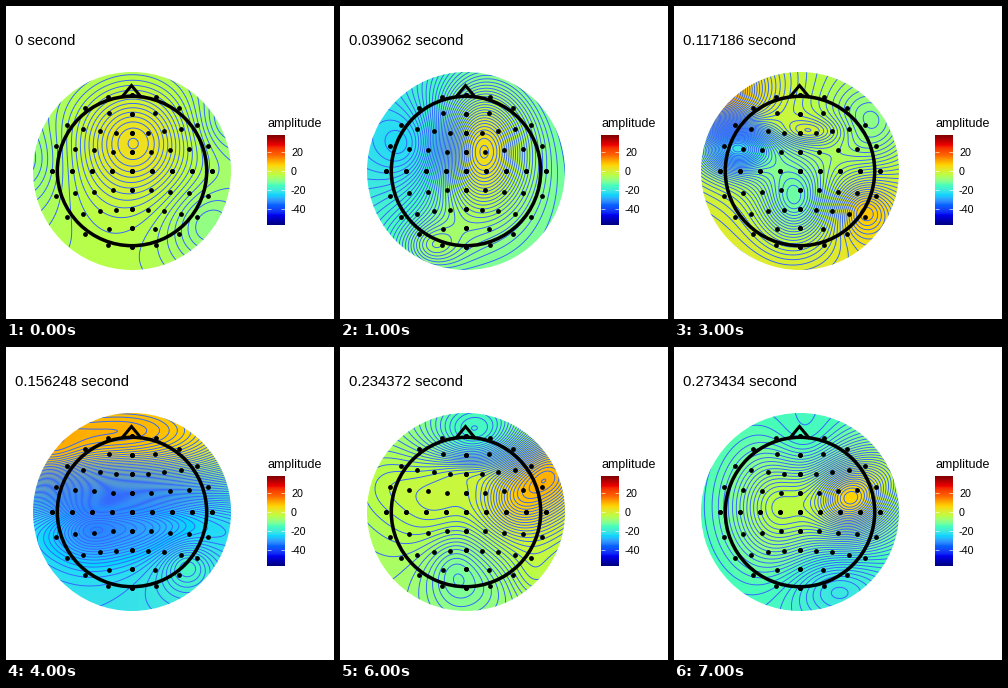
Animation of 328x313 px, one loop 8000 ms. Source, as a matplotlib script:

```python
import numpy as np
import matplotlib.pyplot as plt
from matplotlib.animation import FuncAnimation
from matplotlib.patches import Circle

W, H, DPI = 328, 313, 64
PT = 72 / DPI                      # points per pixel
CX, CY, R = 126, 165, 99
LOW, HIGH = -57, 38
STEP = 0.039062                    # seconds between samples
LEVELS = np.arange(-60, 40, 0.7)
FONT = "Liberation Sans"

# Scalp coordinates: the disc has radius 1 and y points down
axis = np.arange(-R - 1, R + 2)
GX, GY = np.meshgrid(CX + axis, CY + axis)
X, Y = (GX - CX) / R, (GY - CY) / R


def hill(x, y, height, width, tall=1):
    """Smooth source with a long tail; tall is its height-to-width ratio."""
    q = ((X - x) / width) ** 2 + ((Y - y) / (width * tall)) ** 2
    return height / (1 + q) ** 2


def make_fields():
    """One potential map per sample."""
    start = (-7 + 2 * Y + hill(.02, -.3, 12, .85) + hill(-1.1, -.1, -4, .6)
             + hill(.95, -.5, -4, .5) + hill(.75, .55, -5, .6))
    central = (-18 + 2 * X + 2 * Y + hill(.14, -.22, 25, .7, 1.35)
               + hill(-.5, -.25, -10, .65) + hill(-.35, .75, 8, .45, .8))
    patchy = (3 * Y + hill(-.8, -.75, 18, .6) + hill(-.65, -.25, -25, .5, .7)
              + hill(-.05, .3, -13, .5, 1.2) + hill(.1, -.4, 6, .5, .4)
              + hill(.65, .4, 9, .4) + hill(.7, -.45, -9, .65))
    banded = (-23 + hill(0, -.8, 33, 2.5, .4) + hill(0, .1, -17, 1.6, .32)
              + hill(-.9, -.55, 10, .6) + hill(-.45, .17, -5, .45)
              + hill(.55, .52, 7, .4))
    lateral = (3 + hill(.85, -.42, 24, .6) + hill(.15, -.8, -24, .9, .7)
               + hill(0, -.42, 10, .5, .5) + hill(-.8, -.3, 6, .6)
               + hill(-.12, .53, -13, .5, 1.4) + hill(.65, .67, 8, .45))
    paired = (-17 + hill(.5, -.13, 20, .55) + hill(-.26, -.05, 12, .65, 1.4)
              + hill(.05, -.65, -5, .6) + hill(.35, .75, -7, .75, .7)
              + hill(.9, -.4, 7, .6))
    return [start, central, (central + patchy) / 2, patchy,
            banded, lateral, (lateral + paired) / 2, paired]


def make_electrodes():
    """Curved rows mirrored about both axes: (count, spacing, bend)."""
    rows = [(5, 19.9, 0), (5, 19, .38), (5, 16.2, .5), (3, 23.3, 1.4), (2, 24, -2)]
    return np.array([(CX + sx * gap * k, CY + sy * (19 * r + bend * k * k))
                     for r, (count, gap, bend) in enumerate(rows)
                     for k in range(count) for sx in (-1, 1) for sy in (-1, 1)])


FIELDS = make_fields()
ELECTRODES = make_electrodes()

XYZ = np.array([[.4124, .3576, .1805], [.2126, .7152, .0722],
                [.0193, .1192, .9505]])
WHITE = XYZ.sum(axis=1)


def rgb_to_lab(rgb):
    lin = np.where(rgb > .04045, ((rgb + .055) / 1.055) ** 2.4, rgb / 12.92)
    t = lin @ XYZ.T / WHITE
    f = np.where(t > .008856, np.cbrt(t), 7.787 * t + 16 / 116)
    x, y, z = f.T
    return np.stack([116 * y - 16, 500 * (x - y), 200 * (y - z)], axis=1)


def lab_to_rgb(lab):
    y = (lab[:, 0] + 16) / 116
    f = np.stack([y + lab[:, 1] / 500, y, y - lab[:, 2] / 200], axis=1)
    t = np.where(f > .2069, f ** 3, (f - 16 / 116) / 7.787)
    lin = np.clip((t * WHITE) @ np.linalg.inv(XYZ).T, 0, 1)
    return np.where(lin > .0031308, 1.055 * lin ** (1 / 2.4) - .055, 12.92 * lin)


def make_palette(size=512):
    """Jet in ten stops, blended in Lab space."""
    stops, fine = np.linspace(0, 1, 10), np.linspace(0, 1, size)
    jet = np.clip(1.5 - abs(4 * stops[:, None] - [3, 2, 1]), 0, 1)
    lab = [np.interp(fine, stops, c) for c in rgb_to_lab(jet).T]
    return np.clip(lab_to_rgb(np.stack(lab, axis=1)), 0, 1)


PALETTE = make_palette()


def colourise(values):
    t = np.clip((values - LOW) / (HIGH - LOW), 0, 1)
    return PALETTE[np.rint(t * (len(PALETTE) - 1)).astype(int)]


fig = plt.figure(figsize=(W / DPI, H / DPI), dpi=DPI, facecolor="white")
ax = fig.add_axes([0, 0, 1, 1])


def label(x, y, text, size, va="baseline"):
    ax.text(x, y, text, fontsize=size * PT, family=FONT, color="black", va=va)


def draw_legend():
    label(261, 121, "amplitude", 12.5)
    ramp = colourise(np.linspace(HIGH, LOW, 180))[:, None]
    ax.imshow(ramp, extent=(261, 279, 219, 129), aspect="auto")
    for value in (20, 0, -20, -40):
        y = 129 + (HIGH - value) * 90 / (HIGH - LOW)
        for x in (261, 275.4):
            ax.plot([x, x + 3.6], [y, y], color="white", lw=.6 * PT,
                    solid_capstyle="butt")
        label(285, y, str(value), 10.8, "center_baseline")


def draw_scalp(field):
    disc = Circle((CX, CY), R, transform=ax.transData)
    image = ax.imshow(colourise(field), interpolation="bilinear", aspect="auto",
                      extent=(GX.min() - .5, GX.max() + .5,
                              GY.max() + .5, GY.min() - .5))
    image.set_clip_path(disc)
    lines = ax.contour(GX, GY, field, levels=LEVELS, colors="#3366ff",
                       linewidths=.95 * PT, linestyles="solid")
    lines.set_clip_path(disc)


def draw_head():
    ax.add_patch(Circle((CX, CY), 74.7, fill=False, ec="black", lw=3.5 * PT, zorder=4))
    ax.plot([115.5, 125.5, 135.5], [91.5, 79.5, 91.5], color="black", lw=3 * PT,
            solid_joinstyle="miter", solid_capstyle="butt", zorder=4)
    ax.scatter(*ELECTRODES.T, s=(4.8 * PT) ** 2, color="black", lw=0, zorder=5)


def draw(i):
    ax.clear()
    draw_scalp(FIELDS[i])
    draw_head()
    draw_legend()
    label(9, 38.7, f"{round(i * STEP, 6):g} second", 14.9)
    ax.set(xlim=(0, W), ylim=(H, 0))
    ax.axis("off")
    return []


anim = FuncAnimation(fig, draw, frames=len(FIELDS), interval=1000, repeat=True,
                     repeat_delay=0, init_func=lambda: [], blit=False)
plt.show()
```
